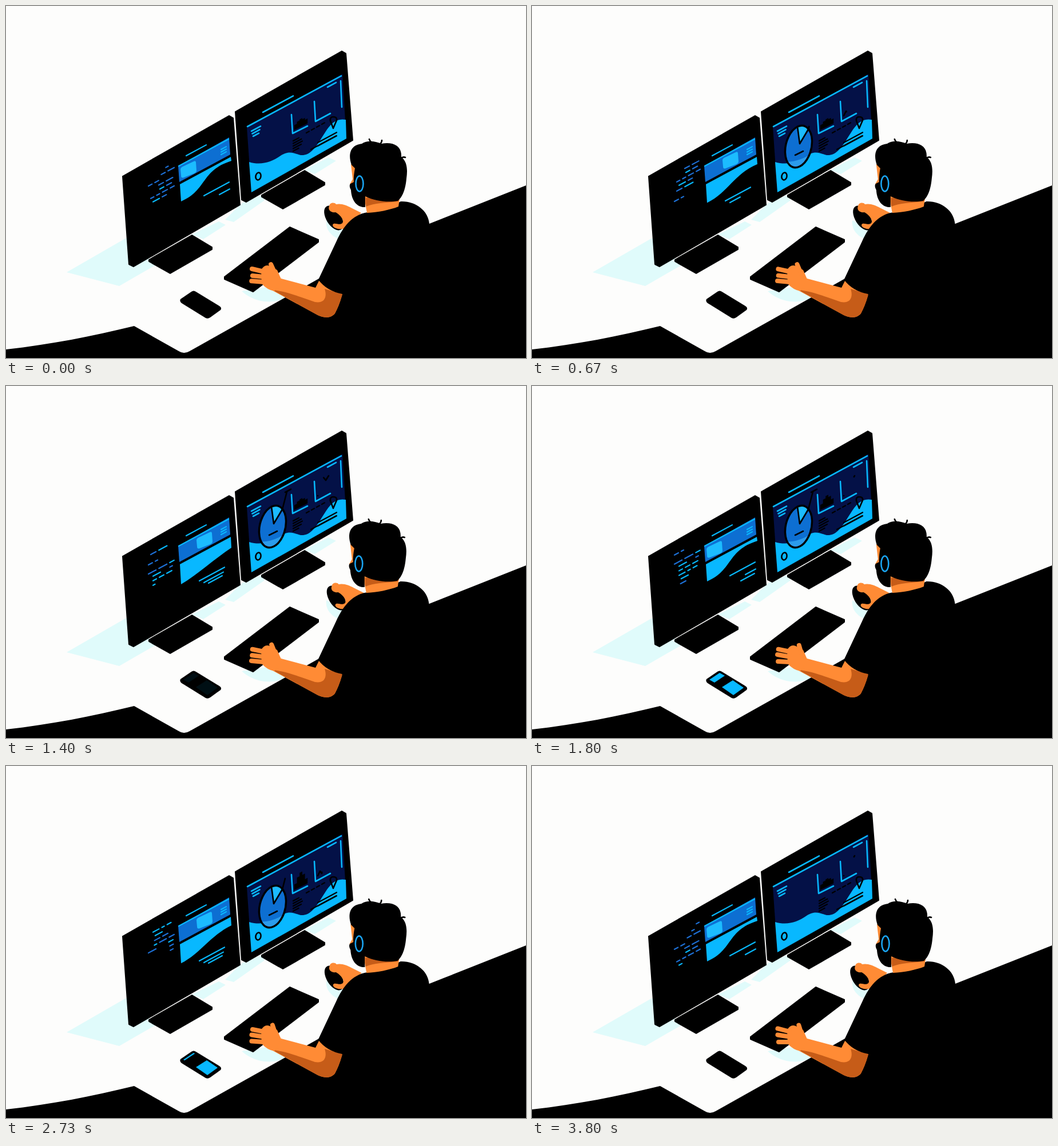
Recreate the animation shown at these times as an HTML page. Size 909 by 616 pixels, loop 3.87 s.

```html
<!DOCTYPE html>
<html lang="en">
<head>
<meta charset="utf-8">
<title>Desk work</title>
<style>
html, body { margin: 0; width: 100%; height: 100%; overflow: hidden; background: #fdfdfc; }
svg { display: block; width: 100%; height: 100%; }
.line { fill: none; stroke-linecap: round; stroke-linejoin: round; stroke-width: 2.6; }
.thin { stroke-width: 2.2; }
.sky { stroke: #08b8ff; }
.ink { stroke: #000; }
.skin { stroke: #ff8b35; stroke-width: 8; }
</style>
</head>
<body>
<svg viewBox="0 0 909 616">
  <defs>
    <g id="monitor" stroke="#000" stroke-width="2" stroke-linejoin="round">
      <path d="M204 298L390 192L397 196L409 348L223 456L215 452Z"/>
      <path d="M250 444L325 401L360 422V426L287 468L250 447Z"/>
    </g>
    <clipPath id="codeClip"><path d="M245 294L299 266V330L245 376Z"/></clipPath>
    <clipPath id="pieClip"><path d="M440 272Q465 275 492 256V290H440Z"/></clipPath>
    <ellipse id="disc" rx="1" ry="1" vector-effect="non-scaling-stroke" transform="matrix(23.5 -11 1.5 35 466 246)"/>
  </defs>

  <!-- soft shadows -->
  <path fill="#e0fbfb" d="M106 466L210 406L262 453L198 490Z
    M325 400L372 377L384 383L345 408Z
    M383 374L412 345L446 331L452 340L398 378Z
    M521 287L564 265L577 271L540 294Z
    M412 499L468 490L488 511C470 521 436 521 412 499Z
    M560 375L590 391L580 407C567 401 558 389 560 375Z"/>

  <!-- floor, monitors, keyboard, phone -->
  <path d="M0 601C80 592 150 578 224 560L302 604Q311 610 321 604L547 477L740 381L909 314V616H0Z"/>
  <use href="#monitor"/>
  <use href="#monitor" x="197" y="-113"/>
  <path stroke="#000" stroke-width="2" stroke-linejoin="round" d="M382 474L496 387L546 409V413L432 500L382 478Z"/>
  <path d="M305 513L324 500Q328 497 332 500L373 525Q378 528 375 532L357 545Q353 548 349 546L307 520Q303 517 305 513Z"/>
  <g id="phone" fill="#08b8ff">
    <path id="phoneBar"/>
    <path d="M332 527L351 515L370 528L352 541Z"/>
  </g>

  <!-- left screen -->
  <path d="M301 280L390 230L392 260L303 308Z" fill="#0d6fd2"/>
  <path id="leftLabels" class="line sky thin"/>
  <path id="button" fill="#1cbcff" d="M309 281L328 272Q332 270 332 274L333 288Q333 291 329 293L311 300Q306 302 306 297L305 286Q305 283 309 281Z"/>
  <path id="hill" fill="#08b8ff"/>
  <path id="caption" class="line sky thin"/>
  <g clip-path="url(#codeClip)" class="line thin">
    <path id="codeBlue" stroke="#1d70d6"/>
    <path id="codeSky" class="sky"/>
  </g>

  <!-- right screen -->
  <path d="M421 212L588 119L595 232L429 326Z" fill="#041147"/>
  <path fill="#08b8ff" d="M425 273C445 279 463 274 480 262C495 252 504 258 515 261C535 263 546 239 558 221C568 205 578 196 594 199L595 232L429 326Z"/>
  <path class="line sky" d="M499 190L501 223L527 210M539 167L541 202L567 188M585 131L587 177"/>
  <path id="rightLabels" class="line sky"/>
  <path id="notes" class="line ink thin"/>
  <path class="line ink" d="M572 214L567 201Q566 194 572 194Q579 194 578 200Z"/>
  <ellipse class="line ink" cx="441" cy="298" rx="4.5" ry="6.5" transform="rotate(12 441 298)"/>
  <path id="bars"/>
  <path id="graph" class="line ink" pathLength="1" d="M545 192L549 184L552 188L554 168L555 160L559 165L564 157"/>
  <g id="pie">
    <use href="#disc" fill="#0d6fd2"/>
    <use href="#disc" fill="#2b9cec" clip-path="url(#pieClip)"/>
    <path d="M468 241L464 211Q473 208 482 214Z" fill="#1cbcff"/>
    <use href="#disc" fill="none" stroke="#000" stroke-width="3.5"/>
    <path class="line ink" d="M464 211L468 241L483 216M460 261L474 254"/>
  </g>
  <path id="pointer" class="line ink"/>

  <!-- mouse hand -->
  <g id="mouse">
    <ellipse cx="573" cy="371" rx="13" ry="24" transform="rotate(-32 573 371)"/>
    <path fill="#ff8b35" d="M565 350C566 344 574 343 577 347C586 345 596 349 603 353L621 362L594 389C586 392 571 390 571 383C573 377 583 385 588 380C592 375 584 365 576 361C568 362 562 357 565 350Z"/>
  </g>

  <!-- typing arm -->
  <path fill="#ff8b35" d="M470 472L481 477L541 493L547 481L588 504Q583 523 575 538C568 547 555 546 545 541L466 498Z"/>
  <path fill="#c65c18" d="M466 497C490 499 516 510 540 518C556 521 562 510 557 495L588 504Q583 523 575 538C568 547 555 546 545 541Z"/>
  <path fill="#ff8b35" d="M446 462Q452 451 461 455L474 462L481 478L469 499Q457 497 447 486Z"/>
  <path id="fingers" class="line skin"/>

  <!-- person -->
  <path id="body" d="M632 361C651 358 671 352 690 342C716 341 738 358 740 381L780 400V560H600L588 504Q561 499 546 479L578 411C589 387 605 365 632 361Z"/>
  <g id="head">
    <path fill="#ff8b35" d="M603 277L614 274V312H601L606 303ZM625 330L688 338L686 351C671 357 650 361 631 362Z"/>
    <path fill="#c65c18" d="M629 336L650 332L688 338L686 342C664 344 644 345 629 351Z"/>
    <path d="M604 278C597 258 603 243 622 241C632 234 646 237 656 241C680 237 692 247 691 264C702 273 702 288 700 302C698 324 692 335 685 341C668 344 646 342 628 333V352C614 353 604 341 603 322Q599 315 602 311L608 308Q607 300 610 284Z"/>
    <path class="line ink" d="M640 239Q636 237 635 233M654 241Q657 239 657 235M690 267Q694 263 698 265"/>
    <ellipse class="line" cx="618" cy="311" rx="6.5" ry="13.5" stroke="#1aa5f3"/>
  </g>
</svg>
<script>
const LOOP = 3870, FRAMES = 58, HALF = LOOP / 2, SLOPE = .54;
const el = id => document.getElementById(id);
const draw = (id, d) => el(id).setAttribute('d', d);
const move = (id, x, y = 0) => el(id).setAttribute('transform', `translate(${x} ${y})`);
const mix = (a, b, k) => a + (b - a) * k;
const clamp = x => Math.max(0, Math.min(1, x));
const noise = n => { const s = Math.sin(n * 91.7 + 3) * 4375.5; return s - Math.floor(s); };
const ease = (t, from, to) => { const k = clamp((t - from) / (to - from)); return k * k * (3 - 2 * k); };
const pulse = (t, rise, top, fall, end) => ease(t, rise, top) - ease(t, fall, end);

// A dash that follows the tilt of the screens.
const dash = (x, y, w) => w > .5 ? `M${x} ${y}l${w} ${-w * SLOPE}` : '';
const stack = (count, make) => Array.from({ length: count }, (_, i) => make(i)).join('');

function drawLabels() {
  draw('leftLabels', dash(315, 262, 35) + dash(302, 280, 87) + stack(3, i => dash(376, 251 + i * 4.5, 9)));
  draw('rightLabels', dash(422, 211, 164) + dash(449, 186, 53) + dash(562, 142, 15) +
    stack(3, i => dash(429 + i * 1.5, 219 + i * 4.5, 16 - i * 3)));
  draw('notes', stack(5, i => dash(502, 236 + i * 4.5, 10 + 6 * Math.sin(i * .8))) +
    stack(4, i => dash(525 + i * 9, 222 - i * 5, 5)) +
    stack(3, i => dash(545 - 12 * (i % 2), 239 + i * 6 - 6 * (i > 1) + 6 * (i % 2), 33 + 11 * (i % 2))));
}

function drawCode(t) {
  const ROWS = 21, STEP = 8, SHOWN = 6;
  const typed = t / LOOP * ROWS;
  const paths = ['', ''];
  for (let row = Math.floor(typed) - SHOWN - 1; row <= typed; row++) {
    const seed = (row + ROWS) % ROWS;
    const y = 307 + (row - typed + SHOWN) * STEP;
    const end = mix(249, 297, clamp(typed - row));
    let x = 249 + Math.floor(noise(seed) * 3) * 4;
    for (let part = 0; x < 290; part++) {
      const width = 4 + noise(seed * 5 + part) * 11;
      const visible = Math.min(width, end - x, 294 - x);
      const color = noise(seed + part * 7) > .6 ? 1 : 0;
      if (noise(seed * 3 + part) > .3) paths[color] += dash(x, y - (x - 249) * SLOPE, visible);
      x += width + 5;
    }
  }
  draw('codeBlue', paths[0]);
  draw('codeSky', paths[1]);
}

function drawLeftScreen(t) {
  const u = t % HALF;
  const slide = pulse(u, 335, 600, 1350, 1700);
  const flat = pulse(u, 400, 950, 1350, 1700);
  move('button', 28 * slide, -16 * slide);
  draw('hill', `M304 312L393 264L394 ${mix(271, 283, flat)}
    C${mix(340, 365, flat)} ${mix(288, 302, flat)} ${mix(352, 335, flat)} ${mix(322, 330, flat)} 306 ${mix(342, 347, flat)}Z`);

  const third = pulse(t, 750, 1050, 3270, 3600);
  draw('caption',
    dash(mix(346, 338, slide), mix(332, 341, slide), 44) +
    dash(mix(373, 346, slide), mix(330, 344, slide), mix(18, 34, slide * third)) +
    dash(mix(365, 354, slide), mix(341, 345, slide), 24 * third));
}

function drawRightScreen(t) {
  const pie = pulse(t, 70, 500, 3270, 3650);
  el('pie').setAttribute('transform', `translate(466 246) scale(${pie}) translate(-466 -246)`);

  const reach = pulse(t, 570, 950, 2500, 2900);
  const flag = Math.max(0, reach - .8) * 50;
  draw('pointer', reach > .01 ? `M483 216l${8 * reach} ${-31 * reach}` + dash(488, 186, flag) : '');

  const rise = pulse(t, 1500, 2100, 2400, 3100);
  draw('bars', stack(5, i => {
    const h = 8 + (6 + 17 * rise) * Math.sin(Math.PI * (i + .5) / 5) ** 2;
    return `M${504 + i * 4.6} ${217 - i * 2.3}v${-h}l4.8 -2.4v${h}Z`;
  }));

  // A short stroke travels along the second chart twice per loop.
  const u = t % HALF;
  const tip = ease(u, 450, 1265), tail = .96 * ease(u, 650, 1650);
  const graph = el('graph');
  graph.style.strokeDasharray = `0 ${tail} ${Math.max(0, tip - tail)} 2`;
  graph.style.visibility = tip > 0 && u < 1890 ? 'visible' : 'hidden';
}

function drawPhone(t) {
  el('phone').style.opacity = pulse(t, 1300, 1500, 3400, 3600);
  const thick = 1 - .75 * ease(t, 1850, 2150);
  draw('phoneBar', `M310 514L328 502l${9 * thick} ${5 * thick}l-18 12Z`);
}

function drawPerson(t) {
  const lean = -1.2 * pulse(t, 0, 670, 2270, 3200);
  move('head', lean);
  move('body', lean / 2);
  move('mouse', 5 * pulse(t, 0, 670, 900, 3200));

  const tap = phase => Math.sin(t / LOOP * Math.PI * 24 + phase);
  draw('fingers', stack(3, i => `M${430 + tap(i * 2)} ${460 + i * 11 + tap(i * 2)}L451 ${465 + i * 9}`) +
    `M${465 + 2 * tap(5)} ${453 + tap(5)}L472 472`);
}

function render() {
  const frame = Math.floor(performance.now() % LOOP / LOOP * FRAMES);
  const t = frame * LOOP / FRAMES;
  drawCode(t);
  drawLeftScreen(t);
  drawRightScreen(t);
  drawPhone(t);
  drawPerson(t);
  requestAnimationFrame(render);
}

drawLabels();
render();
</script>
</body>
</html>
```
